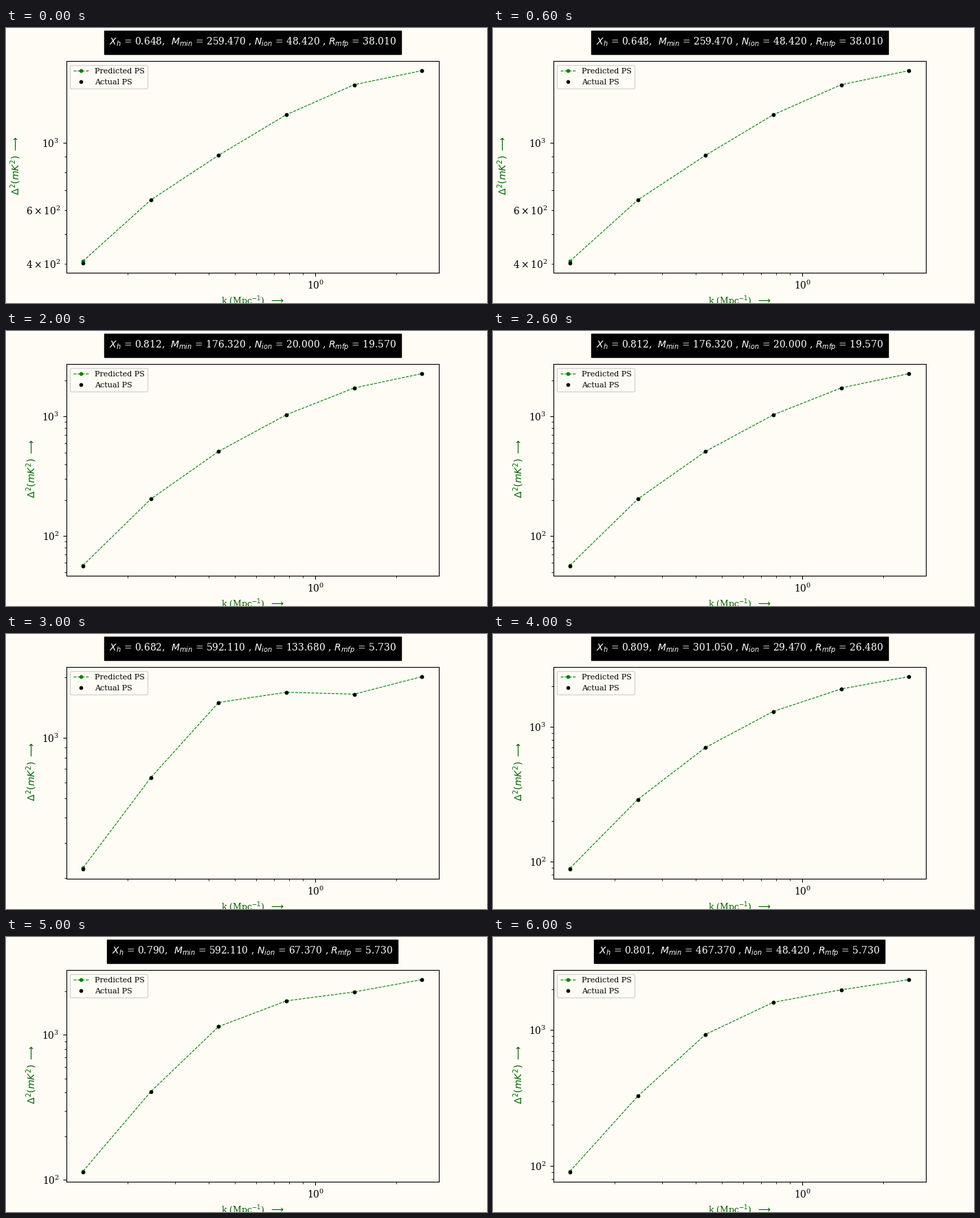
Recreate the animation shown at these times as a matplotlib script. Size 700 by 400 pixels, loop 7000 ms.

```python
import matplotlib.pyplot as plt
import numpy as np
from matplotlib.animation import FuncAnimation

CREAM = "#fffcf5"
LABEL = "darkgreen"
plt.rcParams.update({"font.family": "DejaVu Serif", "axes.facecolor": CREAM})

K = np.geomspace(0.1366, 2.49, 6)

# Grid indices of M_min, N_ion, R_mfp; X_h; lowest and highest power; bend and skew
RUNS = [
    (6, 3, 16, 0.648, 402, 1728, 0.186, -0.002),
    (14, 3, 8, 0.823, 143, 2492, 0.271, 0.030),
    (4, 0, 8, 0.812, 56.1, 2281, 0.210, 0.011),
    (14, 12, 2, 0.682, 222, 2022, 0.389, 0.098),
    (7, 1, 11, 0.809, 88.2, 2354, 0.242, 0.013),
    (14, 5, 2, 0.790, 113, 2404, 0.329, 0.047),
    (11, 3, 2, 0.801, 89.9, 2349, 0.308, 0.026),
]

fig, ax = plt.subplots(figsize=(7, 4), dpi=100, facecolor=CREAM)


def title_text(m, n, r, xh):
    m_min = round(10 + m * 790 / 19, 2)
    n_ion = round(20 + n * 180 / 19, 2)
    r_mfp = round(1.1225 + r * 2.3055, 2)
    return (f"$X_{{h}}$ = {xh:.3f},  $M_{{min}}$ = {m_min:.3f} , "
            f"$N_{{ion}}$ = {n_ion:.3f} , $R_{{mfp}}$ = {r_mfp:.3f}")


def spectrum(low, high, bend, skew):
    """Power law from low to high, bowed by a short sine series in log space."""
    s = np.linspace(0, 1, len(K))
    waves = (bend, skew, 0.036 - 0.49 * bend**2, 0.004 - 0.21 * skew)
    rise = s + sum(a * np.sin(n * np.pi * s) for n, a in enumerate(waves, 1))
    return low * (high / low) ** rise


def draw(i):
    *params, low, high, bend, skew = RUNS[i]
    actual = spectrum(low, high, bend, skew)
    predicted = actual.copy()
    predicted[0] *= 1.016  # the prediction overshoots at the largest scale

    ax.clear()
    ax.loglog(K, predicted, "o--", color="green", lw=0.8, ms=3,
              label="Predicted PS")
    ax.loglog(K, actual, "o", color="black", ms=3, label="Actual PS")
    ax.set_xlabel(r"k (Mpc$^{-1}$)  $\longrightarrow$", color=LABEL, fontsize=9)
    ax.set_ylabel(r" $\Delta^2(mK^2)$ $\longrightarrow$", color=LABEL)
    ax.set_title(title_text(*params), y=1.05, fontsize=10, color="white",
                 bbox=dict(facecolor="black", edgecolor="black", pad=5))
    ax.legend(loc="upper left", fontsize=8)
    return []


anim = FuncAnimation(fig, draw, frames=len(RUNS), interval=1000,
                     init_func=lambda: draw(0), repeat=True, repeat_delay=0)
plt.show()
```
